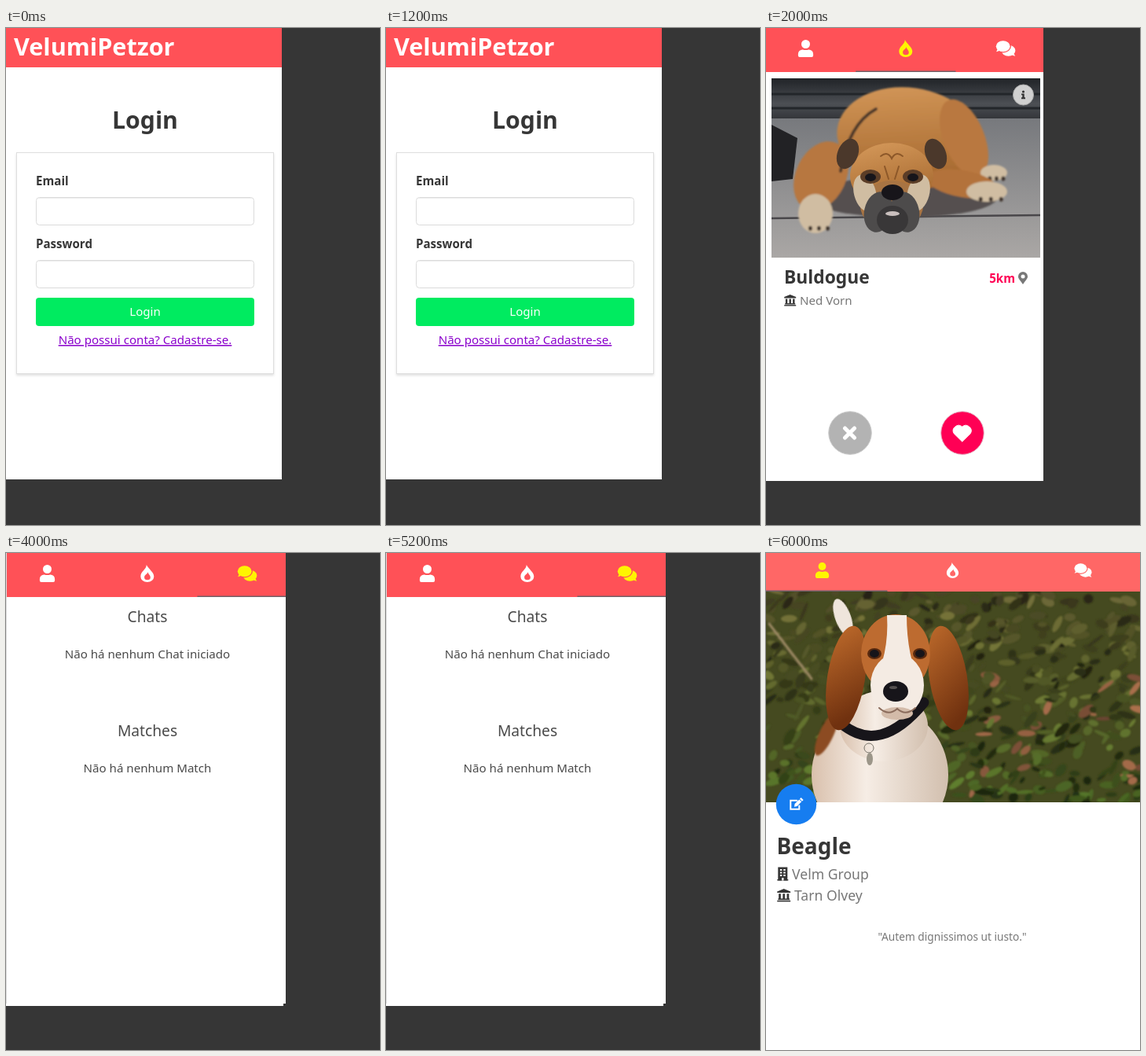
An HTML page for the animation above (8 s loop, 476 px wide and 632 px high).

```html
<!DOCTYPE html>
<html lang="pt">
<head>
<meta charset="utf-8">
<title>Pet dating app</title>
<style>
  html, body { margin: 0; width: 100%; height: 100%; overflow: hidden; background: #363636; }
  #stage { display: block; width: 100vw; height: 100vh; }
  text { font: 15.1px "Noto Sans", "Open Sans", sans-serif; fill: #4a4a4a; }
  .bold { font-weight: 700; fill: #363636; }
  .mid { text-anchor: middle; }
  .soft { fill: #777; }
</style>
</head>
<body>
<svg id="stage" viewBox="0 0 476 632">
  <defs>
    <linearGradient id="wall" x2="0" y2="1">
      <stop stop-color="#202327"/><stop offset=".6" stop-color="#4c4f54"/><stop offset="1" stop-color="#303236"/>
    </linearGradient>
    <linearGradient id="floor" x2="0" y2="1">
      <stop stop-color="#77797d"/><stop offset="1" stop-color="#aaa7a5"/>
    </linearGradient>
    <linearGradient id="tan" x2=".3" y2="1">
      <stop stop-color="#d69a5b"/><stop offset="1" stop-color="#a5682f"/>
    </linearGradient>
    <linearGradient id="ear" x2=".3" y2="1">
      <stop stop-color="#c06c2c"/><stop offset="1" stop-color="#70310f"/>
    </linearGradient>
    <linearGradient id="coat">
      <stop stop-color="#d9c0ac"/><stop offset=".4" stop-color="#f6ede5"/><stop offset="1" stop-color="#d2bfae"/>
    </linearGradient>
    <filter id="blur"><feGaussianBlur stdDeviation="1.3"/></filter>
    <filter id="drop" x="-5%" y="-5%" width="110%" height="110%">
      <feDropShadow dx="0" dy="2" stdDeviation="1.5" flood-color="#0a0a0a" flood-opacity=".12"/>
    </filter>
  </defs>
  <rect width="476" height="632" fill="#363636"/>
  <g id="scenes"></g>
</svg>
<script>
const HOLD = 2000;
const RED = '#ff5157', YELLOW = '#fff500', PINK = '#ff0055', CREAM = '#d0bda2', BLACK = '#17151a';

const rect = (x, y, w, h, fill, extra = '') =>
  `<rect x="${x}" y="${y}" width="${w}" height="${h}" fill="${fill}" ${extra}/>`;
const path = (d, fill, extra = '') => `<path d="${d}" fill="${fill}" ${extra}/>`;
const line = (d, color, width) =>
  path(d, 'none', `stroke="${color}" stroke-width="${width}" stroke-linecap="round"`);
const oval = (x, y, rx, ry, fill, tilt = 0) =>
  `<ellipse rx="${rx}" ry="${ry}" fill="${fill}" transform="translate(${x} ${y}) rotate(${tilt})"/>`;
const disc = (x, y, r, fill, edge = 'none') =>
  `<circle cx="${x}" cy="${y}" r="${r}" fill="${fill}" stroke="${edge}"/>`;
const at = (x, y, body, scale = 1) => `<g transform="translate(${x} ${y}) scale(${scale})">${body}</g>`;
const soft = body => `<g filter="url(#blur)">${body}</g>`;
const text = (x, y, str, cls = '', style = '') =>
  `<text x="${x}" y="${y}" class="${cls}" style="${style}">${str}</text>`;
const size = px => `font-size:${px}px;`;
const repeat = (n, part) => Array.from({ length: n }, (_, i) => part(i)).join('');
const pair = part => part(-1) + part(1);
const photo = (x, y, w, h, body) =>
  `<svg x="${x}" y="${y}" width="${w}" height="${h}" viewBox="${x} ${y} ${w} ${h}">${body}</svg>`;

function rng(seed) {
  return () => (seed = (seed * 16807) % 2147483647) / 2147483647;
}

// Icons, centred on their own origin
const user = c => disc(0, -5.5, 5.5, c) +
  path('M-4 1.4Q0 2.8 4 1.4A5.7 5.7 0 0 1 9.6 7V9a2 2 0 0 1-2 2H-7.6a2 2 0 0 1-2-2V7A5.7 5.7 0 0 1-4 1.4z', c);

const flame = c => path('M-1-11C1-6 8.5-2 8.5 4A8.5 7 0 0 1-8.5 4C-8.5-3-1-5-1-11z' +
  'M1-2C1 1 4 2 4 5A3.8 3.2 0 0 1-3.7 5C-3.7 1.5.5 1 1-2z', c, 'fill-rule="evenodd"');

const tail = 'M7.1 3.8Q8 6 8.8 6.9 6 6.8 3 4.5z';
const bubbles = (c, back) =>
  at(3.4, 2.75, oval(0, 0, 8.9, 6.9, c) + path(tail, c)) +
  at(-3.4, -2.75, oval(0, 0, 10.3, 8.2, back) + oval(0, 0, 8.9, 6.9, c) +
    `<g transform="scale(-1 1)">${path(tail, c)}</g>`);

const heart = path('M0 11-10.6.6A6.9 6.9 0 0 1 0-7.9 6.9 6.9 0 0 1 10.6.6z', '#fff',
  'stroke="#fff" stroke-linejoin="round"');
const cross = line('M-6-6 6 6M6-6-6 6', '#fff', 5);
const pin = path('M0 8C-4.5 1.5-6 .5-6-2A6 6 0 0 1 6-2C6 .5 4.5 1.5 0 8z', '#777') + disc(0, -2, 2.5, '#fff');
const info = disc(0, -4, 1.6, '#333') + path('M-2.5-1.6H1.2V3.2H2.5V5.2H-2.5V3.2H-1.2V.3H-2.5z', '#333');
const edit = line('M1-5H-7V6H4V1.8', '#fff', 2) +
  `<g transform="translate(2.6 -2) rotate(45)">${rect(-2.1, -7.4, 4.2, 2.4, '#fff')}${path('M-2.1-4H2.1V4L0 7-2.1 4z', '#fff')}</g>`;
const landmark = path('M0-7.5 7.5-4.5V-3H-7.5V-4.5z', '#363636') +
  repeat(3, i => rect(-5.8 + 4.6 * i, -2, 2.4, 6, '#363636')) +
  rect(-6.5, 3.5, 13, 1.5, '#363636') + rect(-7.5, 5.6, 15, 1.4, '#363636');
const building = rect(-6, -8.5, 12, 17, '#363636') + rect(-7, 7, 14, 1.5, '#363636') +
  repeat(6, i => rect(i % 2 ? 1 : -3.4, -6 + 3.5 * Math.floor(i / 2), 2.4, 2, '#fff')) +
  rect(-1.2, 5, 2.4, 3.5, '#fff');

// Top bar with three evenly spaced tabs; `on` is the lit, underlined one
function tabs({ x = 0, w, h, back = RED, on, first, gap, y, scale = 1 }) {
  const left = Math.max(x, first + gap * (on - .5));
  const right = Math.min(x + w, first + gap * (on + .5));
  return rect(x, 0, w, h, back) + rect(left, h - 1.5, right - left, 1.5, '#6f6168') +
    [user, flame, bubbles].map((icon, i) => at(first + gap * i, y, icon(i === on ? YELLOW : '#fff', back), scale)).join('');
}

const field = (label, y) => text(38, y, label, 'bold') +
  rect(38.5, y + 15.5, 277, 35, '#fff', 'rx="4" stroke="#dbdbdb"') + line(`M41 ${y + 16.5}H313`, '#eee', 1);

function login() {
  return rect(0, 0, 351, 574, '#fff') + rect(0, 0, 351, 50, RED) +
    text(10, 35, 'VelumiPetzor', 'bold', size(30.6) + 'fill:#fff') +
    text(177, 128, 'Login', 'bold mid', size(30.2)) +
    rect(13.5, 158.5, 327, 281, '#fff', 'stroke="#dedede" filter="url(#drop)"') +
    field('Email', 200) + field('Password', 280) +
    rect(38, 343, 278, 36, '#00eb60', 'rx="4"') +
    text(177, 366, 'Login', 'mid', 'fill:#fff') +
    text(177, 402, 'Não possui conta? Cadastre-se.', 'mid', 'fill:#8a00cc;text-decoration:underline');
}

function bulldog() {
  const paw = (x, y, rx, ry) => oval(x, y, rx, ry, CREAM) +
    repeat(3, i => oval(x + rx * (i * .5 - .3), y + ry * .75, 2.5, 3, '#40362e'));
  const face = s => oval(s * 56, -28, 13, 20, '#4b382b', s * -22) +
    oval(s * 34, 22, 14, 24, CREAM, s * 15) +
    oval(s * 27, 1, 13, 9, '#5b3d27') + oval(s * 27, 2, 7, 5, BLACK);
  return photo(7, 64, 342, 228,
    rect(7, 64, 342, 54, 'url(#wall)') + rect(7, 115, 342, 177, 'url(#floor)') +
    repeat(2, i => line(`M7 ${84 + 18 * i}H349`, '#23262a', 3)) +
    line('M7 242 349 238', '#49474a', 2.5) +
    path('M7 123 40 140 34 192 7 195z', '#222225') +
    soft(oval(175, 215, 120, 26, '#55504f') +
      oval(182, 140, 92, 64, 'url(#tan)', 8) +
      oval(252, 140, 26, 52, '#b9783f', -22) + paw(290, 184, 17, 10) +
      oval(250, 198, 46, 17, '#b3723a', 10) + paw(281, 208, 26, 13) +
      oval(70, 188, 32, 46, '#b7773f', 25) + paw(63, 236, 22, 25) +
      line('M95 182Q105 122 140 103', '#4c392b', 4)) +
    at(160, 188, oval(0, 0, 53, 42, 'url(#tan)') + oval(0, 38, 40, 32, '#a87443') + pair(face) +
      line('M-14-25Q-5-32 0-22 5-32 14-25M-9-12-4 4M9-12 4 4', '#8d5829', 2) +
      pair(s => oval(s * 17, 46, 18, 26, '#4d4b4b', s * -12)) + oval(1, 56, 20, 18, '#393738') +
      oval(1, 48, 9, 3, '#c9bfbd') + oval(1, 21, 14, 10, BLACK)));
}

function swipe() {
  return rect(0, 0, 353, 576, '#fff') +
    tabs({ w: 353, h: 56, on: 1, first: 50.5, gap: 127.3, y: 26 }) + bulldog() +
    disc(327.5, 85, 13, '#d0d0d0', '#aaa') + at(327.5, 85, info) +
    text(23, 325, 'Buldogue', 'bold', size(22.8)) +
    text(317, 324, '5km', 'bold', `fill:${PINK};text-anchor:end`) + at(327, 318, pin) +
    at(30.7, 346.5, landmark) + text(43, 352, 'Ned Vorn', 'soft') +
    disc(107, 515, 27.3, '#b3b3b3', '#ccc') + at(106.5, 515, cross) +
    disc(250, 515, 27.3, PINK, '#e5b5c5') + at(249.7, 515, heart);
}

function chats() {
  const section = (y, head, note) => text(180, y, head, 'mid', size(19.2)) + text(180, y + 46, note, 'mid');
  return rect(0, 0, 353, 576, '#fff') + rect(0, 0, 356, 573, '#fff') + rect(0, 0, 1, 573, '#dcdcdc') +
    tabs({ x: 1, w: 355, h: 56, on: 2, first: 52.5, gap: 127.3, y: 26 }) +
    section(88, 'Chats', 'Não há nenhum Chat iniciado') +
    section(233, 'Matches', 'Não há nenhum Match');
}

// Dappled grass, greener towards the bottom, with a few dry leaves
function meadow() {
  const rand = rng(41);
  return rect(0, 49, 476, 268, '#454a20') + soft(repeat(650, () => {
    const x = rand() * 476, depth = rand(), leaf = x > 230 && depth > .4 && rand() < .12;
    const color = leaf ? `hsl(22 38% ${30 + rand() * 20}%)`
      : `hsl(${54 + depth * 32} ${32 + depth * 16}% ${10 + rand() * 24}%)`;
    return oval(x, 49 + depth * 268, 4 + rand() * 9, 2 + rand() * 4, color, -70 + rand() * 100);
  }) + line('M4 90 58 160', '#9a8762', 3));
}

function beagle() {
  const eye = s => oval(s * 29, 0, 9, 7, '#57290f') + oval(s * 29, 0, 6, 5, BLACK);
  return photo(0, 49, 476, 268, meadow() +
    oval(98, 82, 10, 25, '#efe5dc', -20) +
    oval(145, 282, 87, 88, 'url(#coat)') + oval(150, 220, 56, 45, 'url(#coat)') +
    soft(oval(77, 230, 9, 30, '#8c4b20', 25)) +
    line('M96 217Q145 258 201 190', BLACK, 13) +
    disc(131, 248, 6, 'none', '#77736a') + oval(132, 262, 4, 8, '#9c9689') +
    at(167, 128,
      pair(s => oval(s * 65, 31, 24, 67, 'url(#ear)', s * -9)) +
      oval(-2, 0, 44, 50, '#bd6b30') + oval(0, 40, 34, 40, '#f4ebe3') +
      path('M-13-49H12Q12 2 30 42H-32Q-10 2-13-49z', '#f4ebe3') + pair(eye) +
      oval(0, 76, 20, 8, '#d3bba9') + line('M-23 69Q-11 80 0 70 11 80 23 69', '#8b6c5c', 2) +
      oval(-2, 48, 16, 13, BLACK) + oval(-5, 43, 5, 2, '#55504f')));
}

function profile() {
  return rect(0, 0, 476, 632, '#fff') +
    tabs({ w: 476, h: 49, back: '#ff6766', on: 0, first: 71.5, gap: 166, y: 22, scale: .9 }) + beagle() +
    disc(38.5, 319.5, 25.7, '#167df0') + at(38.3, 319.7, edit) +
    text(13.5, 383, 'Beagle', 'bold', size(28)) +
    at(21.3, 408, building) + text(33, 415, 'Velm Group', 'soft', size(17.6)) +
    at(22.7, 435.5, landmark, 1.13) + text(36, 442, 'Tarn Olvey', 'soft', size(17.6)) +
    text(237, 493, '"Autem dignissimos ut iusto."', 'soft mid', size(13.7));
}

const root = document.getElementById('scenes');
root.innerHTML = [login, swipe, chats, profile].map(scene => `<g>${scene()}</g>`).join('');
const scenes = [...root.children];

function render(ms) {
  const now = Math.floor(ms / HOLD) % scenes.length;
  scenes.forEach((g, i) => { g.style.display = i === now ? '' : 'none'; });
}

const start = performance.now();
function tick() {
  render(performance.now() - start);
  requestAnimationFrame(tick);
}
tick();
</script>
</body>
</html>
```
